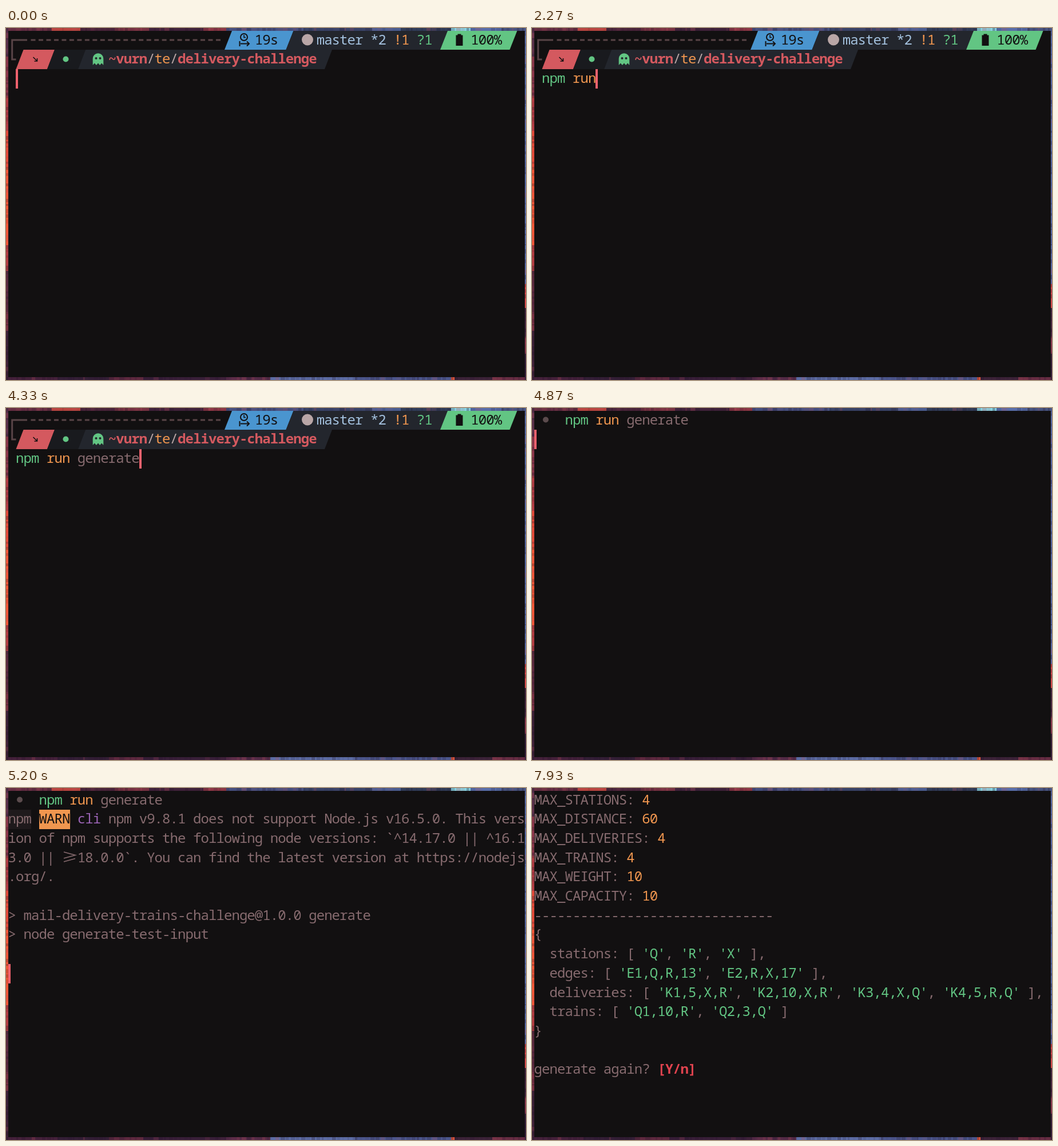
An HTML page with a canvas that plays this animation: 909x616 px, repeating every 8 s.

```html
<!DOCTYPE html>
<html lang="en">
<head>
<meta charset="utf-8">
<title>Terminal session</title>
<style>
  html, body { margin: 0; width: 100%; height: 100%; overflow: hidden; background: #121011; }
  canvas { display: block; }
</style>
</head>
<body>
<canvas id="stage" width="909" height="616"></canvas>
<script>
const ctx = document.getElementById('stage').getContext('2d');
const LOOP = 8000, LEFT = 4, TOP = 4.5, CELL = 13.478, ROW = 33.7;
const BG = '#121011', PANEL = '#23262d', GREY = '#876b6f', RED = '#d4595f', PINK = '#f0626e',
  ORANGE = '#f0964f', GREEN = '#62c583', BLUE = '#4a95cf', SKY = '#a3c0dd', PURPLE = '#9a63b4', LINE = '#594447';

const colX = col => LEFT + col * CELL;
const rowY = row => Math.round(TOP + row * ROW);

function box(x, y, w, h, color) {
  ctx.fillStyle = color;
  ctx.fillRect(x, y, w, h);
}

function dot(x, y, r, color) {
  ctx.fillStyle = color;
  ctx.beginPath();
  ctx.arc(x, y, r, 0, 7);
  ctx.fill();
}

function stroke(points, color, width) {
  ctx.strokeStyle = color;
  ctx.lineWidth = width;
  ctx.beginPath();
  points.forEach(([x, y]) => ctx.lineTo(x, y));
  ctx.stroke();
}

// Writes text on the character grid and returns the next free column.
function write(row, col, text, color = GREY, weight = 300) {
  ctx.font = `${weight} 24px "Noto Sans Mono", "DejaVu Sans Mono", monospace`;
  ctx.textAlign = 'center';
  ctx.fillStyle = color;
  for (const ch of text) ctx.fillText(ch, colX(col++ + 0.5), rowY(row) + 24);
  return col;
}

// Writes a line, giving every part that matches the pattern its own colour.
function writeMarked(row, text, pattern, color) {
  let col = 0;
  text.split(pattern).forEach((part, i) => { col = write(row, col, part, i % 2 ? color : GREY); });
}

function cursor(row, col) {
  box(Math.floor(colX(col)), rowY(row), 4, 34, PINK);
}

function highlight(row, col, length, color) {
  box(Math.round(colX(col)), rowY(row), Math.round(length * CELL), 34, color);
}

function segment(row, x1, x2, color) {
  const top = rowY(row), bottom = rowY(row + 1);
  ctx.fillStyle = color;
  ctx.beginPath();
  ctx.moveTo(x1 + 13, top);
  ctx.lineTo(x2 + 13, top);
  ctx.lineTo(x2, bottom);
  ctx.lineTo(x1, bottom);
  ctx.fill();
}

function clockIcon() {
  ctx.strokeStyle = BG;
  ctx.lineWidth = 2;
  ctx.beginPath();
  ctx.arc(416, 16, 6, 0, 7);
  ctx.stroke();
  stroke([[416, 12], [416, 16.5], [419, 16.5]], BG, 1.5);
  stroke([[408.5, 23], [408.5, 32]], BG, 2);
  stroke([[410, 27.5], [425, 27.5]], BG, 2);
  stroke([[421, 23.5], [425, 27.5], [421, 31.5]], BG, 2);
}

function ghostIcon() {
  ctx.fillStyle = GREEN;
  ctx.beginPath();
  ctx.arc(161, 53.5, 9.3, Math.PI, 0);
  for (let i = 0; i <= 6; i++) ctx.lineTo(170.3 - i * 3.1, i % 2 ? 61.5 : 65);
  ctx.fill();
  dot(157.5, 53, 2, PANEL);
  dot(164.5, 53, 2, PANEL);
}

function drawPrompt() {
  stroke([[37, 21], [10.7, 21], [10.7, 55], [17.5, 55]], LINE, 3);
  for (let x = 43.5; x < 370; x += CELL) box(x, 19.5, 8, 3, LINE);

  segment(0, 382, 489.5, BLUE);
  segment(0, 489.5, 759, PANEL);
  segment(0, 759, 880.5, GREEN);
  clockIcon();
  write(0, 32, '19s', BG);
  dot(527, 20.5, 10, '#b9a6a6');
  write(0, 40, 'master *2', SKY);
  write(0, 50, '!1', ORANGE);
  write(0, 53, '?1', GREEN);
  box(789.5, 10.5, 6, 3, BG);
  box(786.5, 12.5, 12, 18.5, BG);
  write(0, 60, '100%', BG);

  segment(1, 17.5, 72, RED);
  segment(1, 72, 126, '#191a1e');
  segment(1, 126, 557, PANEL);
  stroke([[47.5, 51], [54, 57.5]], BG, 1.6);
  stroke([[54.5, 53], [54.5, 58], [49.5, 58]], BG, 1.6);
  dot(104.5, 54.5, 5, GREEN);
  ghostIcon();
  let col = write(1, 13, '~vurn', RED, 600);
  col = write(1, col, '/', '#b9a6a6');
  col = write(1, col, 'te', ORANGE);
  col = write(1, col, '/', '#b9a6a6');
  write(1, col, 'delivery-challenge', RED, 600);
}

const COMMAND = 'npm run generate';
const KEY_TIMES = [600, 1070, 1330, 1530, 1870, 2070, 2270, 2400, 2530, 2670, 2800, 3000, 3470, 3670, 3870, 4270];

function writeCommand(row, col, length) {
  const typed = COMMAND.slice(0, length);
  write(row, col, typed.slice(0, 3), length < 3 ? RED : GREEN);
  write(row, col + 4, typed.slice(4, 7), length < 7 ? GREY : ORANGE);
  write(row, col + 8, typed.slice(8));
}

function drawTyping(t) {
  drawPrompt();
  const length = KEY_TIMES.filter(key => key <= t).length;
  writeCommand(2, 1, length);
  cursor(2, 1 + length);
}

function drawRun(t) {
  dot(24, 20.5, 5, '#5b4b4d');
  writeCommand(0, 4, COMMAND.length);
  if (t < 5000) return cursor(1, 0);

  highlight(1, 0, 3, '#1f1a1c');
  highlight(1, 4, 4, ORANGE);
  write(1, 0, 'npm');
  write(1, 4, 'WARN', BG);
  write(1, 9, 'cli', PURPLE);
  write(1, 13, 'npm v9.8.1 does not support Node.js v16.5.0. This vers');
  write(2, 0, 'ion of npm supports the following node versions: `^14.17.0 || ^16.1');
  write(3, 0, '3.0 ||   18.0.0`. You can find the latest version at https://nodejs');
  write(4, 0, '.org/.');
  stroke([[101, 112], [121, 117.5], [101, 123]], GREY, 1.7);
  stroke([[101, 129], [121, 123.5]], GREY, 1.7);
  if (t < 5130) return cursor(5, 0);

  write(6, 0, '> mail-delivery-trains-challenge@1.0.0 generate');
  write(7, 0, '> node generate-test-input');
  cursor(9, 0);
}

const LIMITS = { STATIONS: 4, DISTANCE: 60, DELIVERIES: 4, TRAINS: 4, WEIGHT: 10, CAPACITY: 10 };
const RESULT = [
  '-'.repeat(31),
  '{',
  "  stations: [ 'Q', 'R', 'X' ],",
  "  edges: [ 'E1,Q,R,13', 'E2,R,X,17' ],",
  "  deliveries: [ 'K1,5,X,R', 'K2,10,X,R', 'K3,4,X,Q', 'K4,5,R,Q' ],",
  "  trains: [ 'Q1,10,R', 'Q2,3,Q' ]",
  '}'
];

function drawResult(t) {
  Object.entries(LIMITS).forEach(([name, value], row) =>
    writeMarked(row, `MAX_${name}: ${value}`, /(\d+)/, ORANGE));
  RESULT.forEach((line, i) => writeMarked(6 + i, line, /('.*?')/, GREEN));
  write(14, 0, 'generate again?');
  write(14, 16, '[Y/n]', '#e0434f', 600);
  if (t < 7930) cursor(14, 22);
}

// Wallpaper strips that show around the window: [start, colour] runs with seeded flecks.
function drawWallpaper() {
  let seed = 7;
  const random = () => (seed = seed * 16807 % 2147483647) / 2147483647;
  const strip = (runs, end, place) => runs.forEach(([start, color], i) => {
    const stop = i + 1 < runs.length ? runs[i + 1][0] : end;
    place(start, stop - start, color);
    for (let p = start; p < stop; p += 9) {
      ctx.globalAlpha = random() * 0.3;
      place(p, Math.min(2 + random() * 7, stop - p), random() < 0.75 ? '#24142a' : '#b54a58');
      ctx.globalAlpha = 1;
    }
  });
  const across = (y, h) => (p, size, color) => box(p, y, size, h, color);
  const down = (x, w) => (p, size, color) => box(x, p, w, size, color);

  strip([[0, '#6a3044'], [80, '#b8443e'], [130, '#4a243a'], [190, '#783242'], [250, '#40223a'], [345, '#8c3644'],
    [385, '#465080'], [520, '#394368'], [640, '#4c5e92'], [690, '#303c58'], [778, '#86d2e0'], [812, '#566eaa'],
    [866, '#465480']], 909, across(0, 5));
  strip([[0, '#44203a'], [90, '#341e36'], [180, '#5e283e'], [240, '#381e38'], [385, '#552a46'], [462, '#5c6ca4'],
    [610, '#4b568c'], [778, '#e65a3e'], [784, '#3c2238'], [850, '#682c42']], 909, across(611, 5));
  strip([[0, '#583048'], [50, '#883648'], [120, '#b03c42'], [180, '#e04a38'], [245, '#ee5636'], [380, '#b03c40'],
    [425, '#58283c'], [500, '#783042'], [530, '#3c2036']], 616, down(0, 4));
  strip([[0, '#586ca8'], [448, '#d84a4a'], [490, '#4a2840'], [540, '#84384c'], [570, '#38203a']], 616, down(907, 2));
}

function frame(now) {
  const t = now % LOOP;
  box(LEFT, 5, 903, 606, BG);
  ctx.save();
  ctx.beginPath();
  ctx.rect(LEFT, 5, 903, 606);
  ctx.clip();
  if (t < 4870) drawTyping(t);
  else if (t < 5270) drawRun(t);
  else drawResult(t);
  ctx.restore();
  requestAnimationFrame(frame);
}

drawWallpaper();
requestAnimationFrame(frame);
</script>
</body>
</html>
```
